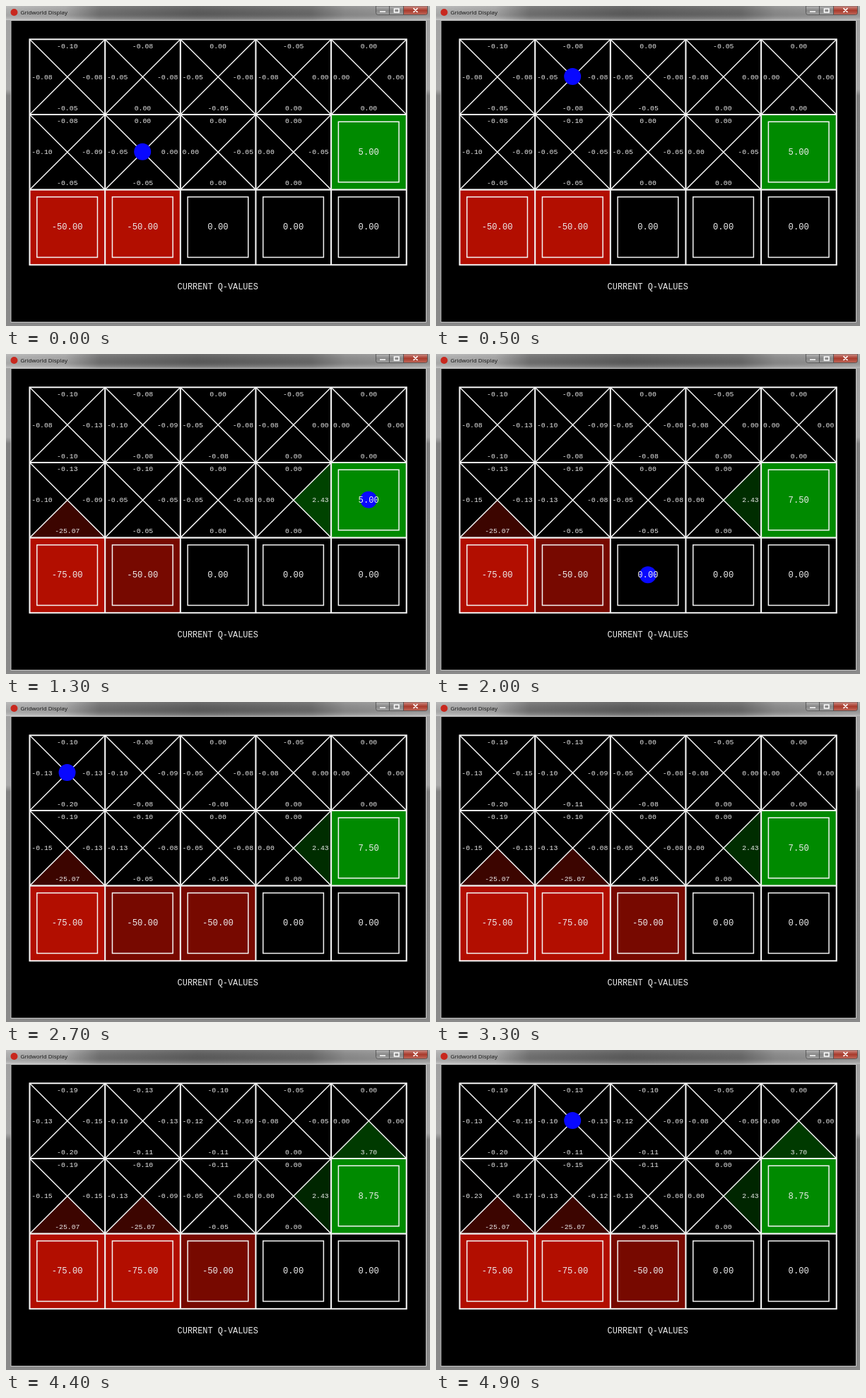
Write an HTML page that moves like this. It is 600 px wide and 454 px high and loops after 5 s.

```html
<!DOCTYPE html>
<html lang="en">
<head>
<meta charset="utf-8">
<title>Gridworld Display</title>
<style>
html, body { margin: 0; width: 100%; height: 100%; overflow: hidden; background: #000; }
svg { display: block; width: 600px; height: 454px; }
.mono { font-family: "Liberation Mono", "Courier New", monospace; fill: #ececec; }
.small { font-size: 9.8px; }
.big { font-size: 12.2px; }
.label { font-size: 11.9px; }
.bar { font: 8px "Open Sans", "Noto Sans", sans-serif; fill: #111; }
.line { fill: none; stroke: #f4f4f4; }
</style>
</head>
<body>
<svg id="stage" viewBox="0 0 600 454" xmlns="http://www.w3.org/2000/svg">
  <defs>
    <linearGradient id="top">
      <stop offset="0" stop-color="#b4b4b4"/>
      <stop offset=".14" stop-color="#a8a8a8"/>
      <stop offset=".22" stop-color="#747474"/>
      <stop offset=".45" stop-color="#5e5e5e"/>
      <stop offset=".72" stop-color="#6c6c6c"/>
      <stop offset=".8" stop-color="#8e8e8e"/>
      <stop offset="1" stop-color="#a2a2a2"/>
    </linearGradient>
    <linearGradient id="gloss" x2="0" y2="1">
      <stop offset="0" stop-color="#fff" stop-opacity=".1"/>
      <stop offset=".5" stop-color="#000" stop-opacity=".05"/>
      <stop offset="1" stop-color="#fff" stop-opacity=".3"/>
    </linearGradient>
    <linearGradient id="side" x2="0" y2="1">
      <stop offset="0" stop-color="#a0a0a0"/>
      <stop offset=".26" stop-color="#a8a8a8"/>
      <stop offset=".28" stop-color="#808080"/>
      <stop offset="1" stop-color="#8a8a8a"/>
    </linearGradient>
    <linearGradient id="grey" x2="0" y2="1">
      <stop offset="0" stop-color="#b8b8b8"/>
      <stop offset=".5" stop-color="#888"/>
      <stop offset="1" stop-color="#a0a0a0"/>
    </linearGradient>
    <linearGradient id="red" x2="0" y2="1">
      <stop offset="0" stop-color="#cf9088"/>
      <stop offset=".5" stop-color="#a83a2c"/>
      <stop offset="1" stop-color="#c0685a"/>
    </linearGradient>
  </defs>
  <rect width="600" height="454" fill="url(#side)"/>
  <rect width="600" height="20" fill="url(#top)"/>
  <rect width="600" height="20" fill="url(#gloss)"/>
  <rect x="7" y="20.5" width="587.5" height="428" fill="#000" stroke="#c4c4c4"/>
  <circle cx="11.5" cy="9" r="5" fill="#c8281e"/>
  <text class="bar" x="20.5" y="12">Gridworld Display</text>
  <g stroke="#4c4c4c" stroke-width=".8">
    <path d="M523.5 0h19v12.5h-16q-3 0-3-3z" fill="url(#grey)"/>
    <path d="M542.5 0h20v12.5h-20z" fill="url(#grey)"/>
    <path d="M562.5 0h34v9.5q0 3-3 3h-31z" fill="url(#red)"/>
  </g>
  <g fill="none" stroke="#fff" stroke-width="1.6">
    <path d="M529 8h8M549.5 4h6.5v5h-6.5zM576.5 3.2l6 5.6m0-5.6l-6 5.6"/>
  </g>
  <g id="fills"></g>
  <g id="lines" class="line" stroke-width="1.5"></g>
  <circle id="agent" r="12" fill="#0808ff"/>
  <g id="texts" class="mono"></g>
  <text class="mono label" x="299.7" y="402.3" text-anchor="middle">CURRENT Q-VALUES</text>
</svg>
<script>
const X0 = 33.5, Y0 = 47.3, SIZE = 106.65, ROWS = 3, COLS = 5;
const LOOP = 5000, TICK = 100;
const RATE = 0.5, LIVING = -0.1;
const MOVES = { N: [-1, 0], W: [0, -1], E: [0, 1], S: [1, 0] };
const DIRS = Object.keys(MOVES);

// Starting action values per cell, in N W E S order; a single number marks an exit cell.
const START = [
  [[-.1, -.075, -.075, -.05], [-.075, -.05, -.075, 0], [0, -.05, -.075, -.05], [-.05, -.075, 0, 0], [0, 0, 0, 0]],
  [[-.075, -.1, -.0875, -.05], [0, -.05, 0, -.05], [0, 0, -.05, 0], [0, 0, -.05, 0], [5]],
  [[-50], [-50], [0], [0], [0]]
];

// Start time, end time, and the actions between: X exits a cell, A begins an episode.
const EPISODES = [
  [0, 800, "EWNSNWSSX"],
  [800, 1300, "ANEESEE"],
  [1300, 2000, "XAEWWEES"],
  [2000, 2700, "XANWSNSN"],
  [2700, 3900, "NNENSSXAEENNNWE"],
  [3900, 4900, "SNEESXAWWEEWN"]
];

const $ = id => document.getElementById(id);

function add(parent, name, attrs) {
  const node = document.createElementNS("http://www.w3.org/2000/svg", name);
  for (const key in attrs) node.setAttribute(key, attrs[key]);
  return parent.appendChild(node);
}

// Ties round away from zero for small values, toward zero for large penalties.
const format = v => (v + (v < 0 && v > -9 ? -1e-6 : 1e-6)).toFixed(2);

function learn(state, action) {
  const { q, pos } = state;
  if (action === "A") {
    state.pos = [1, 0];
    return;
  }
  const [r, c] = pos, cell = q[r][c];
  if (action === "X") {
    cell[0] += RATE * ((r === 1 ? 10 : -100) - cell[0]);
    state.pos = null;
    return;
  }
  const i = DIRS.indexOf(action), [dr, dc] = MOVES[action];
  const next = q[r + dr] && q[r + dr][c + dc] ? [r + dr, c + dc] : pos;
  const best = Math.max(...q[next[0]][next[1]]);
  cell[i] += RATE * (LIVING + best - cell[i]);
  state.pos = next;
}

function stateAt(time) {
  const state = { q: START.map(row => row.map(cell => [...cell])), pos: [1, 1] };
  for (const [from, to, actions] of EPISODES) {
    const part = Math.max(0, Math.min(1, (time - from) / (to - from)));
    const count = Math.floor(actions.length * part + 1e-9);
    for (const action of actions.slice(0, count)) learn(state, action);
  }
  return state;
}

function buildCell(r, c) {
  const x = X0 + c * SIZE, y = Y0 + r * SIZE, h = SIZE / 2;
  const cx = x + h, cy = y + h, x1 = x + SIZE, y1 = y + SIZE;
  const part = (d, tx, ty, anchor, size) => ({
    fill: add($("fills"), "path", { d }),
    text: add($("texts"), "text", { x: tx, y: ty, "text-anchor": anchor, class: size })
  });
  if (START[r][c].length === 1) {
    add($("lines"), "rect", { x: x + 10.3, y: y + 10.3, width: SIZE - 21, height: SIZE - 21 });
    return [part(`M${x} ${y}H${x1}V${y1}H${x}z`, cx - .2, cy + 3.5, "middle", "big")];
  }
  add($("lines"), "path", { d: `M${x} ${y}L${x1} ${y1}M${x1} ${y}L${x} ${y1}` });
  const wedge = (ax, ay, bx, by) => `M${ax} ${ay}L${bx} ${by}L${cx} ${cy}z`;
  return [
    part(wedge(x, y, x1, y), cx, y + 12.4, "middle", "small"),
    part(wedge(x, y, x, y1), x + 2.8, cy + 3, "start", "small"),
    part(wedge(x1, y, x1, y1), x1 - 3.4, cy + 3, "end", "small"),
    part(wedge(x, y1, x1, y1), cx, y1 - 6.4, "middle", "small")
  ];
}

const cells = START.map((row, r) => row.map((_, c) => buildCell(r, c)));

let grid = "";
for (let c = 0; c <= COLS; c++) grid += `M${X0 + c * SIZE} ${Y0}v${ROWS * SIZE}`;
for (let r = 0; r <= ROWS; r++) grid += `M${X0 - 1} ${Y0 + r * SIZE}h${COLS * SIZE + 2}`;
add($("lines"), "path", { d: grid, "stroke-width": 2.1 });

function draw(time) {
  const { q, pos } = stateAt(time);
  const all = q.flat(2), low = Math.min(...all), high = Math.max(...all);
  const shade = v => v < 0
    ? `rgb(${Math.round(178 * v / low)},${Math.round(14 * v / low)},0)`
    : `rgb(0,${Math.round(138 * v / high)},0)`;
  cells.forEach((row, r) => row.forEach((parts, c) => parts.forEach((p, i) => {
    const v = q[r][c][i];
    p.fill.setAttribute("fill", shade(v));
    p.text.textContent = format(v);
  })));
  const agent = $("agent");
  agent.setAttribute("visibility", pos ? "visible" : "hidden");
  if (pos) {
    agent.setAttribute("cx", X0 + (pos[1] + .5) * SIZE - .3);
    agent.setAttribute("cy", Y0 + (pos[0] + .5) * SIZE - .6);
  }
}

const begin = performance.now();
let shown = -1;
function frame() {
  const time = (performance.now() - begin) % LOOP;
  const tick = Math.floor(time / TICK);
  if (tick !== shown) {
    shown = tick;
    draw(tick * TICK);
  }
  requestAnimationFrame(frame);
}
frame();
</script>
</body>
</html>
```
